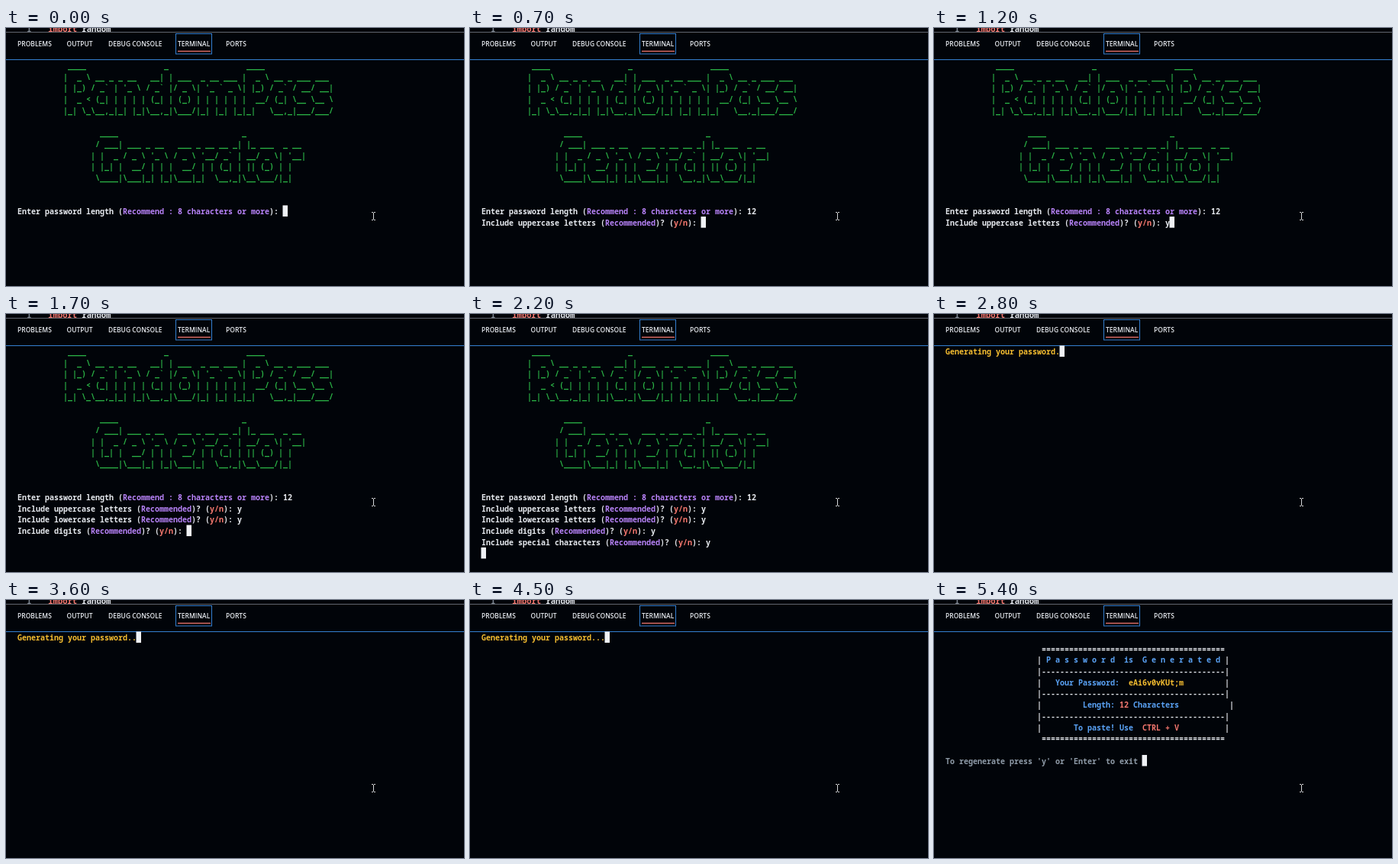
An HTML page with a canvas for the animation above (5.5 s loop, 600 by 338 pixels).

```html
<!DOCTYPE html>
<html lang="en">
<head>
<meta charset="utf-8">
<title>Password generator terminal</title>
<style>
  html, body { margin: 0; width: 100%; height: 100%; overflow: hidden; background: #010409; }
  canvas { display: block; }
</style>
</head>
<body>
<canvas id="stage" width="600" height="338"></canvas>
<script>
const ctx = document.getElementById('stage').getContext('2d');
const LOOP = 5500;
const LEFT = 15, CELL = 6, LINE = 14.69, BASE = 53;
const MONO = '"Noto Sans Mono", "DejaVu Sans Mono", monospace';
const SANS = '"Open Sans", "Noto Sans", sans-serif';
const C = {
  back: '#010409', white: '#e6e9ee', green: '#2bb547', purple: '#b782f7', red: '#f7786f',
  yellow: '#f5bd30', blue: '#5aa2f5', grey: '#8f9ba8', focus: '#347fd0', rule: '#63666d'
};

const TITLE = [
  String.raw` ____                 _                 ____`,
  String.raw`|  _ \ __ _ _ __   __| | ___  _ __ ___ |  _ \ __ _ ___ ___`,
  String.raw`| |_) / _$ | '_ \ / _$ |/ _ \| '_ $ _ \| |_) / _$ / __/ __|`,
  String.raw`|  _ < (_| | | | | (_| | (_) | | | | | |  __/ (_| \__ \__ \ `,
  String.raw`|_| \_\__,_|_| |_|\__,_|\___/|_| |_| |_|_|   \__,_|___/___/`
];
const SUBTITLE = [
  String.raw`  ____                           _`,
  String.raw` / ___| ___ _ __   ___ _ __ __ _| |_ ___  _ __`,
  String.raw`| |  _ / _ \ '_ \ / _ \ '__/ _$ | __/ _ \| '__|`,
  String.raw`| |_| |  __/ | | |  __/ | | (_| | || (_) | |`,
  String.raw` \____|\___|_| |_|\___|_|  \__,_|\__\___/|_|`
];

const yesNo = what => [
  'white', `Include ${what} (`, 'purple', 'Recommended', 'white', ')? (',
  'red', 'y/n', 'white', '): '
];

// Each answer: prompt, time the prompt appears, [key, time] pairs.
const PROMPTS = [
  { at: 0, keys: [['1', 200], ['2', 400]],
    text: ['white', 'Enter password length (', 'purple', 'Recommend : 8 characters or more', 'white', '): '] },
  { at: 600, keys: [['y', 1000]], text: yesNo('uppercase letters') },
  { at: 1300, keys: [['y', 1500]], text: yesNo('lowercase letters') },
  { at: 1600, keys: [['y', 1800]], text: yesNo('digits') },
  { at: 1900, keys: [['y', 2100]], text: yesNo('special characters') }
];
const ENTERED = 2200, NEWLINE = 2500, CLEARED = 2600, DOT_STEP = 900, RESULT = 5300;

function rect(x, y, w, h, color) {
  ctx.fillStyle = color;
  ctx.fillRect(x, y, w, h);
}

function label(text, x, y, font, color) {
  ctx.font = font;
  ctx.fillStyle = color;
  ctx.fillText(text, x, y);
}

function print(row, col, text, color = 'white') {
  label(text, LEFT + col * CELL, BASE + row * LINE, `700 10px ${MONO}`, C[color]);
  return col + text.length;
}

function printRuns(row, runs) {
  let col = 0;
  for (let i = 0; i < runs.length; i += 2) col = print(row, col, runs[i + 1], runs[i]);
  return col;
}

function cursor(row, col) {
  rect(LEFT + col * CELL - 0.5, 41.4 + row * LINE, 6.5, 14.6, '#f0f2f5');
}

function printArt(lines, row, col) {
  lines.forEach((line, i) => print(row + i, col, line.replaceAll('$', '`'), 'green'));
}

function drawPrompts(t) {
  printArt(TITLE, 0, 10);
  printArt(SUBTITLE, 6, 16);
  let row = 13, col = 0;
  PROMPTS.forEach((prompt, i) => {
    if (t < prompt.at) return;
    row = 13 + i;
    const typed = prompt.keys.filter(key => t >= key[1]).map(key => key[0]).join('');
    col = print(row, printRuns(row, prompt.text), typed);
  });
  if (t >= ENTERED) [row, col] = [t >= NEWLINE ? 19 : 18, 0];
  cursor(row, col);
}

function drawProgress(t) {
  const dots = 1 + Math.floor((t - CLEARED) / DOT_STEP);
  cursor(0, print(0, 0, 'Generating your password' + '.'.repeat(dots), 'yellow'));
}

function drawResult() {
  [1, 9].forEach(row => print(row, 21, '='.repeat(40)));
  for (let row = 2; row < 9; row++) {
    print(row, 20, '|');
    print(row, row === 6 ? 62 : 61, '|');
    if (row % 2) print(row, 21, '-'.repeat(40));
  }
  print(2, 22, 'P a s s w o r d  is  G e n e r a t e d', 'blue');
  print(4, 24, 'Your Password:', 'blue');
  print(4, 40, 'eAi6v0vKUt;m', 'yellow');
  print(6, 30, 'Length:', 'blue');
  print(6, 38, '12', 'red');
  print(6, 41, 'Characters', 'blue');
  print(8, 28, 'To paste! Use', 'blue');
  print(8, 43, 'CTRL + V', 'red');
  cursor(11, print(11, 0, "To regenerate press 'y' or 'Enter' to exit ", 'grey'));
}

function drawPanel() {
  rect(0, 0, 600, 338, C.back);
  const code = `700 10.5px ${MONO}`;
  label('1', 27, 4.8, code, '#7d8590');
  label('import', 55.3, 4.8, code, C.red);
  label('random', 99.5, 4.8, code, C.white);
  rect(0, 5, 600, 7, C.back);
  rect(0, 5, 600, 1, C.rule);
  rect(0, 41, 600, 1, C.focus);

  const tabs = { PROBLEMS: 15, OUTPUT: 79.5, 'DEBUG CONSOLE': 134, TERMINAL: 225, PORTS: 288 };
  for (const name in tabs) label(name, tabs[name], 23.7, `600 8.5px ${SANS}`, C.white);
  ctx.strokeStyle = C.focus;
  ctx.lineWidth = 1;
  ctx.strokeRect(222.5, 7.5, 47, 26.5);
  rect(225, 29.8, 43, 1.2, C.red);
}

function drawPointer() {
  rect(481, 242, 1, 9, '#d5d7da');
  [241, 251].forEach(y => {
    rect(479, y, 2, 1, '#d5d7da');
    rect(482, y, 2, 1, '#d5d7da');
  });
}

function frame(now) {
  const t = now % LOOP;
  drawPanel();
  if (t < CLEARED) drawPrompts(t);
  else if (t < RESULT) drawProgress(t);
  else drawResult();
  drawPointer();
  requestAnimationFrame(() => frame(performance.now() - start));
}

const start = performance.now();
frame(0);
</script>
</body>
</html>
```
